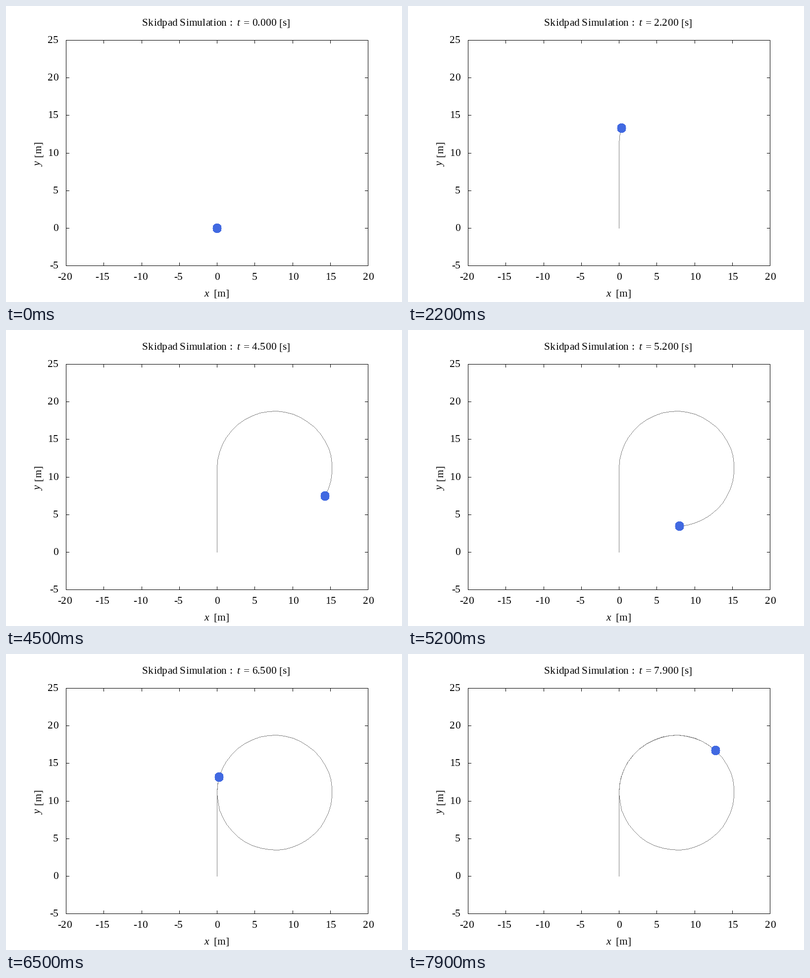
A matplotlib script that plays this animation: 800x600 px, repeating every 8 s.

```python
import numpy as np
import matplotlib.pyplot as plt
from matplotlib.animation import FuncAnimation
from matplotlib.textpath import text_to_path

W, H, DPI = 800, 600, 100
FRAMES, STEP = 80, 0.1
L, R, T, B = 121, 731, 69, 526            # plot box in pixels
FONT_PX = 64 / 3
SPEED = 40 / 3.6                          # cornering speed, m/s
T_IN = 2.0                                # end of the straight
RADIUS = 7.625
GRAY, BLUE = (128, 128, 128), (65, 105, 225)


def to_px(x, y):
    col = L + (x + 20) * (R - L) / 40
    row = B - (y + 5) * (B - T) / 30
    return int(np.floor(col + 0.5)), int(np.floor(row + 0.5))


def position(t):
    """Accelerate from rest along y, then circle clockwise at constant speed."""
    if t <= T_IN:
        return 0.0, 0.5 * SPEED / T_IN * t * t
    a = SPEED / RADIUS * (t - T_IN)
    return RADIUS * (1 - np.cos(a)), SPEED * T_IN / 2 + RADIUS * np.sin(a)


def draw_line(img, p, q, color):
    n = max(abs(q[0] - p[0]), abs(q[1] - p[1]), 1)
    cols = np.floor(np.linspace(p[0], q[0], n + 1) + 0.5).astype(int)
    rows = np.floor(np.linspace(p[1], q[1], n + 1) + 0.5).astype(int)
    img[rows, cols] = color


def draw_dot(img, p):
    j, i = np.mgrid[-9:10, -9:10]
    mask = (i * i + j * j <= 90) & ((abs(i) < 9) | (j == 0))
    img[p[1] + j[mask], p[0] + i[mask]] = BLUE


fig = plt.figure(figsize=(W / DPI, H / DPI), dpi=DPI, facecolor="white")
ax = fig.add_axes([0, 0, 1, 1])
ax.axis("off")


def advance(artist):
    prop = artist.get_fontproperties()
    w, _, _ = text_to_path.get_text_width_height_descent(
        artist.get_text(), prop, False)
    return round(w * DPI / 72)


def put(x, y, s, style="normal", vertical=False):
    """Set a run of glyphs on whole-pixel advances; return artists and length."""
    glyphs, pen = [], 0
    for ch in s:
        gx, gy = (x, y - pen) if vertical else (x + pen, y)
        g = ax.text(gx, gy, ch, family="Liberation Serif", style=style,
                    size=FONT_PX * 72 / DPI, color="black",
                    ha="left", va="baseline", rotation_mode="anchor",
                    rotation=90 if vertical else 0)
        glyphs.append(g)
        pen += advance(g)
    return glyphs, pen


def width(s):
    glyphs, w = put(0, 0, s)
    for g in glyphs:
        g.remove()
    return w


# Frame and ticks
base = np.full((H, W, 3), 255, np.uint8)
base[[T, B], L:R + 1] = 0
base[T:B + 1, [L, R]] = 0
for v in range(-20, 21, 5):
    c, _ = to_px(v, 0)
    base[T:T + 7, c] = 0
    base[B - 6:B + 1, c] = 0
    s = str(v)
    shift = -3 if v < 0 else 0
    put(round(c + 0.6 - width(s) / 2 + shift), 555, s)
for v in range(-5, 26, 5):
    _, r = to_px(0, v)
    base[r, L:L + 7] = 0
    base[r, R - 6:R + 1] = 0
    put(106 - width(str(v)), r + 6, str(v))

# Labels and title
put(400, 589, "x", "italic")
put(419, 589, "[m]")
put(71, 325, "y", "italic", vertical=True)
put(71, 306, "[m]", vertical=True)
put(275, 40, "Skidpad Simulation :")
put(466, 40, "t", "italic")
put(480, 40, "=")
clock, span = put(497, 40, "0.000")
put(497 + span + 5, 40, "[s]")

path = [to_px(*position(k * STEP)) for k in range(FRAMES)]
view = ax.imshow(base, extent=(0, W, H, 0), aspect="auto",
                 interpolation="nearest")
ax.set_xlim(0, W)
ax.set_ylim(H, 0)


def update(k):
    img = base.copy()
    for p, q in zip(path[:k], path[1:k + 1]):
        draw_line(img, p, q, GRAY)
    draw_dot(img, path[k])
    view.set_data(img)
    for g, ch in zip(clock, f"{k * STEP:.3f}"):
        g.set_text(ch)
    return [view, *clock]


anim = FuncAnimation(fig, update, frames=FRAMES, interval=100,
                     repeat=True, repeat_delay=0, blit=False)
plt.show()
```
